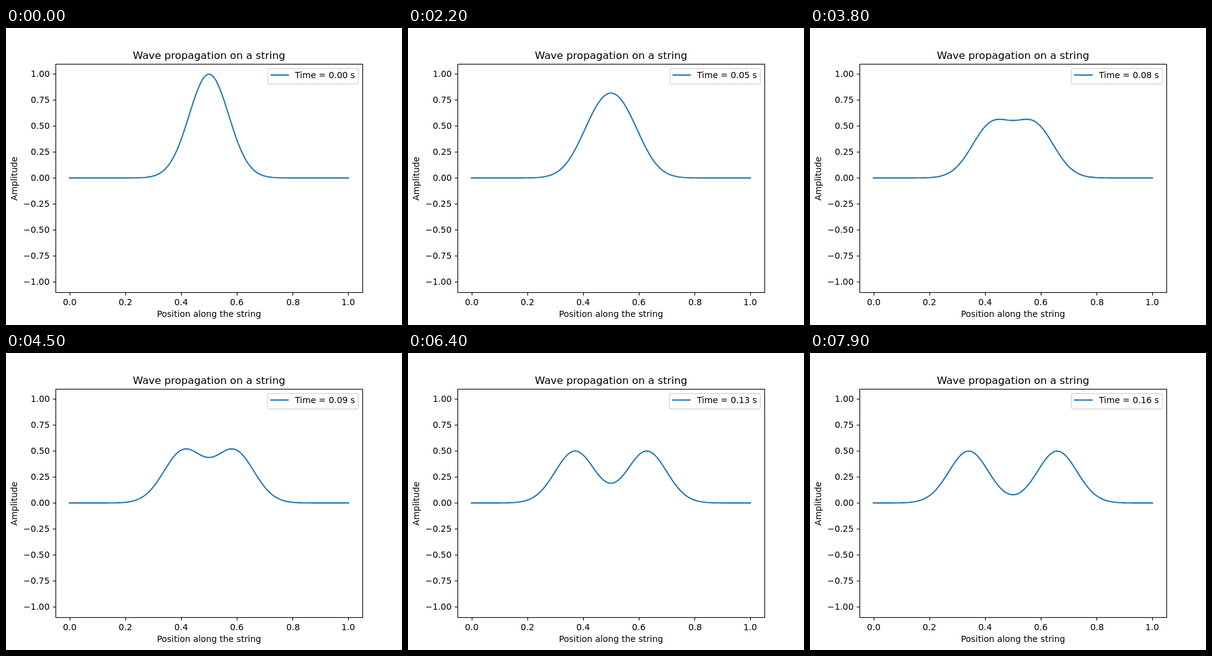
These frames come from a looping animation (640x480 px, 8 s). An HTML page with a canvas:

```html
<!DOCTYPE html>
<html lang="en">
<head>
<meta charset="utf-8">
<title>Wave propagation on a string</title>
<style>
  html, body { margin: 0; width: 100%; height: 100%; overflow: hidden; background: #fff; }
  canvas { display: block; }
</style>
</head>
<body>
<canvas id="stage" width="640" height="480"></canvas>
<script>
const ctx = document.getElementById('stage').getContext('2d');
const BLUE = '#1f77b4';
const FRAMES = 80, FRAME_MS = 100;
const POINTS = 100, DT = 0.002;
const AXES = { left: 80, right: 576, top: 57.6, bottom: 427.2 };
const PT = 100 / 72;

const px = x => 102.545 + x * 450.91;
const py = y => 242.4 - y * 168;
const snap = v => Math.floor(v + 0.5) + 0.5;

// Leapfrog solution of the wave equation with fixed ends.
function solve() {
  const r2 = (DT * (POINTS - 1)) ** 2;
  const start = Array.from({ length: POINTS }, (_, i) =>
    Math.exp(-100 * (i / (POINTS - 1) - 0.5) ** 2));
  const states = [start];
  let prev = start;
  while (states.length < FRAMES) {
    const u = states[states.length - 1];
    const next = u.map((v, i) => i === 0 || i === POINTS - 1 ? 0 :
      2 * v - prev[i] + r2 * (u[i + 1] - 2 * v + u[i - 1]));
    prev = u;
    states.push(next);
  }
  return states;
}

// Aligns by the ink of the text and starts it on a whole pixel.
function text(str, x, y, align = 'center', size = 10) {
  ctx.font = `${size * PT}px "DejaVu Sans", sans-serif`;
  ctx.textAlign = 'left';
  ctx.fillStyle = '#000';
  const box = ctx.measureText(str);
  const right = box.actualBoundingBoxRight, left = -box.actualBoundingBoxLeft;
  const shift = { left: 0, center: (left + right) / 2, right }[align];
  ctx.fillText(str, Math.round(x - shift), y);
}

function line(x1, y1, x2, y2) {
  ctx.beginPath();
  ctx.moveTo(x1, y1);
  ctx.lineTo(x2, y2);
  ctx.stroke();
}

function drawAxes() {
  const l = snap(AXES.left), r = snap(AXES.right);
  const t = snap(AXES.top), b = snap(AXES.bottom);
  const tick = 3.5 * PT;
  ctx.strokeStyle = '#000';
  ctx.lineWidth = 0.8 * PT;
  ctx.lineCap = 'butt';
  ctx.lineJoin = 'miter';
  ctx.strokeRect(l, t, r - l, b - t);

  for (let i = 0; i <= 5; i++) {
    const x = px(i / 5);
    line(snap(x), b, snap(x), b + tick);
    text((i / 5).toFixed(1), x, 448);
  }
  for (let i = -4; i <= 4; i++) {
    const y = py(i / 4);
    const label = (i < 0 ? '\u2212' : '') + Math.abs(i / 4).toFixed(2);
    line(l - tick, snap(y), l, snap(y));
    text(label, 70, Math.round(y + 5), 'right');
  }
}

function drawLabels() {
  text('Wave propagation on a string', 328, 50, 'center', 12);
  text('Position along the string', 328, 467);
  ctx.save();
  ctx.translate(18, 279);
  ctx.rotate(-Math.PI / 2);
  text('Amplitude', 0, 0, 'left');
  ctx.restore();
}

function drawCurve(u) {
  ctx.strokeStyle = BLUE;
  ctx.lineWidth = 1.5 * PT;
  ctx.lineCap = 'square';
  ctx.lineJoin = 'round';
  ctx.beginPath();
  u.forEach((v, i) => ctx.lineTo(px(i / (POINTS - 1)), py(v)));
  ctx.stroke();
}

function drawLegend(n) {
  const time = ((n + 1) * DT).toFixed(2);
  // Some digits make the label slightly wider.
  const wide = time >= '0.08' || time === '0.01' || time === '0.06';
  const left = wide ? 422.5 : 423.5;

  ctx.beginPath();
  ctx.roundRect(left, 65.5, 569.5 - left, 25, 2.8);
  ctx.fillStyle = 'rgba(255,255,255,0.8)';
  ctx.fill();
  ctx.strokeStyle = 'rgba(204,204,204,0.8)';
  ctx.lineWidth = PT;
  ctx.stroke();

  const x = wide ? 428 : 428.5;
  ctx.strokeStyle = BLUE;
  ctx.lineWidth = 1.5 * PT;
  ctx.lineCap = 'square';
  line(x, 76, x + 27.8, 76);
  text(`Time = ${time} s`, 467, 81, 'left');
}

const states = solve();

function draw(now) {
  const n = Math.floor(now / FRAME_MS) % FRAMES;
  ctx.fillStyle = '#fff';
  ctx.fillRect(0, 0, 640, 480);
  drawAxes();
  drawLabels();
  drawCurve(states[n]);
  drawLegend(n);
}

const begin = performance.now();
function tick() {
  draw(performance.now() - begin);
  requestAnimationFrame(tick);
}
tick();
</script>
</body>
</html>
```
